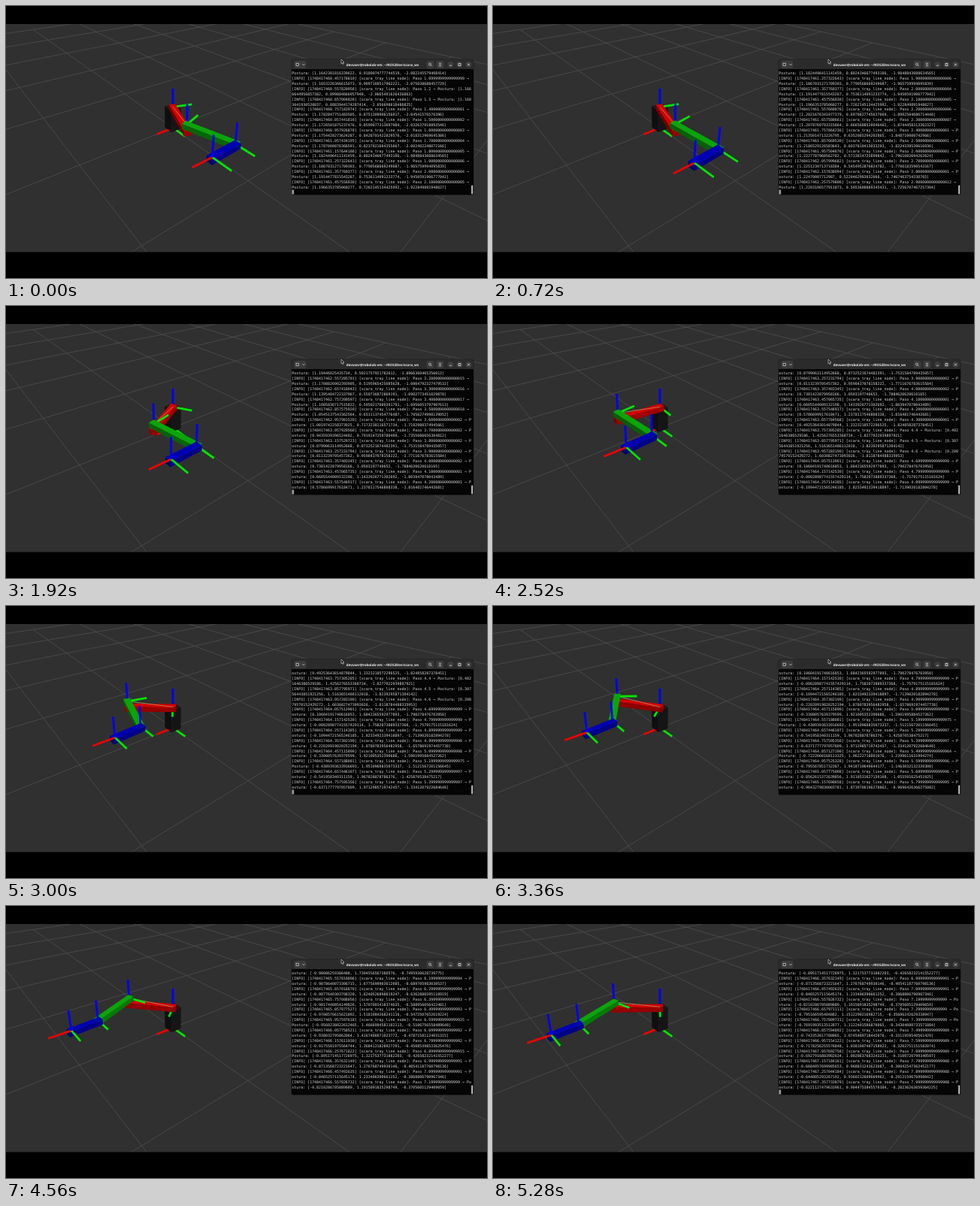
Animation of 640x362 px, one loop 5.4 s. Source, as an HTML page with a canvas:

```html
<!DOCTYPE html>
<html lang="en">
<head>
<meta charset="utf-8">
<title>Robot arm and terminal</title>
<style>
html, body { margin: 0; width: 100%; height: 100%; overflow: hidden; background: #000; }
canvas { display: block; }
</style>
</head>
<body>
<canvas id="stage" width="640" height="362"></canvas>
<script>
const ctx = document.getElementById('stage').getContext('2d');
const LOOP = 5400, STEP = 120;
const RED = [212, 0, 0], GREEN = [10, 165, 10], BLUE = [0, 0, 180], BLACK = [28, 28, 28];

// Lengths in metres
const LINK = 0.45, TOOL = 0.25, AXIS = 0.2, BASE_Z = -0.243;
const HEIGHTS = { elbow: 0.058, wrist: 0.025, tip: 0.009 };

const camera = { x: 222, y: 110, lookZ: 0.2, scale: 137.5, yaw: 0.646, pitch: 0.433, pull: 0.292 };

// Joint angles for a tray path: quintic timing over 10 s along a sine-bent diagonal
function jointAngles(time) {
  const t = time / 10;
  const p = t ** 3 * (10 - 15 * t + 6 * t * t);
  const x = -0.05 + 0.9 * p;
  const y = 0.8 - 0.9 * p + 0.25 * Math.sin(2 * Math.PI * p);
  const q2 = Math.acos((x * x + y * y) / (2 * LINK * LINK) - 1);
  return [Math.atan2(y, x) - q2 / 2, q2];
}

function nearness([x, y, z]) {
  const { yaw, pitch, lookZ, pull } = camera;
  return 1 - pull * (x * Math.sin(yaw) + y * Math.cos(yaw) + (z - lookZ) * Math.tan(pitch));
}

function project(point) {
  const [x, y, z] = point;
  const { yaw, pitch, scale, lookZ } = camera;
  const right = y * Math.sin(yaw) - x * Math.cos(yaw);
  const front = x * Math.sin(yaw) + y * Math.cos(yaw);
  const k = scale / nearness(point);
  return [camera.x + k * right,
    camera.y + k * (front * Math.sin(pitch) - (z - lookZ) * Math.cos(pitch))];
}

function line(points, color, width) {
  ctx.beginPath();
  points.forEach(p => ctx.lineTo(...p));
  ctx.strokeStyle = color;
  ctx.lineWidth = width;
  ctx.stroke();
}

function rect(x, y, w, h, color, radius = 0) {
  ctx.beginPath();
  ctx.roundRect(x, y, w, h, radius);
  ctx.fillStyle = color;
  ctx.fill();
}

function face(points, color, light) {
  ctx.beginPath();
  points.forEach(p => ctx.lineTo(...project(p)));
  ctx.closePath();
  ctx.fillStyle = `rgb(${color.map(c => Math.round(c * light))})`;
  ctx.fill();
}

const raise = ([x, y, z], dz) => [x, y, z + dz];

function box(p, q, half, height, color, overhang = 0.03) {
  const len = Math.hypot(q[0] - p[0], q[1] - p[1]);
  const dx = (q[0] - p[0]) / len, dy = (q[1] - p[1]) / len;
  const corner = (o, along, side) => [
    o[0] + dx * along * overhang - dy * side * half,
    o[1] + dy * along * overhang + dx * side * half, o[2]];
  const top = [corner(p, -1, -1), corner(q, 1, -1), corner(q, 1, 1), corner(p, -1, 1)];
  const normals = [[dy, -dx], [dx, dy], [-dy, dx], [-dx, -dy]];
  normals.forEach(([nx, ny], i) => {
    if (nx * Math.sin(camera.yaw) + ny * Math.cos(camera.yaw) <= 0) return;
    const a = top[i], b = top[(i + 1) % 4];
    face([a, b, raise(b, -height), raise(a, -height)], color, 0.55 + 0.2 * Math.max(0, ny));
  });
  face(top, color, 1);
}

function axes([x, y, z], angle) {
  const c = Math.cos(angle) * AXIS, s = Math.sin(angle) * AXIS;
  const o = project([x, y, z]);
  line([o, project([x + c, y + s, z])], '#f00000', 2.8);
  line([o, project([x - s, y + c, z])], '#00e600', 2.8);
  line([o, project([x, y, z + AXIS])], '#0000f5', 2.8);
}

function gridLine(from, to) {
  const near = 0.08, w0 = nearness(from), w1 = nearness(to);
  if (w0 < near) return;
  const f = w1 < near ? (w0 - near) / (w0 - w1) : 1;
  const end = from.map((v, i) => v + (to[i] - v) * f);
  line([project(from), project(end)], '#4f4f4f', 0.8);
}

function drawGrid() {
  for (let n = -5; n <= 5; n++) {
    gridLine([-5, n, BASE_Z], [5, n, BASE_Z]);
    gridLine([n, -5, BASE_Z], [n, 5, BASE_Z]);
  }
}

function drawRobot(time) {
  const [q1, q2] = jointAngles(time);
  const reach = ([x, y], length, angle, z) =>
    [x + length * Math.cos(angle), y + length * Math.sin(angle), z];
  const shoulder = [0, 0, 0];
  const elbow = reach(shoulder, LINK, q1, HEIGHTS.elbow);
  const wrist = reach(elbow, LINK, q1 + q2, HEIGHTS.wrist);
  const tip = reach(wrist, TOOL, 0, HEIGHTS.tip);

  axes([0, 0, BASE_Z], 0);
  box([-0.058, 0, 0], [0.058, 0, 0], 0.058, -BASE_Z, BLACK, 0);
  const parts = [
    [shoulder, elbow, () => {
      axes(shoulder, q1);
      box([0, 0, 0.015], [elbow[0], elbow[1], 0.015], 0.033, 0.055, RED);
      line([project(shoulder), project(elbow)], '#b09a68', 0.8);
    }],
    [elbow, wrist, () => {
      axes(elbow, q1 + q2);
      box(raise(elbow, 0.015), raise(wrist, 0.015), 0.033, 0.05, GREEN);
    }],
    [wrist, tip, () => {
      axes(wrist, 0);
      box(raise(wrist, 0.01), raise(tip, 0.01), 0.033, 0.05, BLUE);
      axes(tip, 0);
    }]
  ];
  const distance = ([p, q]) => nearness(p) + nearness(q);
  parts.sort((a, b) => distance(b) - distance(a)).forEach(part => part[2]());
}

function logEntry(entry) {
  let time = 0;
  for (let n = 0; n < entry; n++) time += 0.1;
  const ms = 357 + 100 * entry;
  const noise = Math.abs(Math.sin(entry * 12.9898) * 43758.5453) % 1;
  const stamp = 1748417459 + Math.floor(ms / 1000) + '.' +
    String(ms % 1000).padStart(3, '0') + String(Math.floor(noise * 1e6)).padStart(6, '0');
  const [q1, q2] = jointAngles(time);
  return `[INFO] [${stamp}] [scara_tray_line_node]: Paso ${time} → ` +
    `Postura: [${q1}, ${q2}, ${-q1 - q2}]`;
}

function text(str, x, y, font, color, align = 'left') {
  ctx.font = font;
  ctx.fillStyle = color;
  ctx.textAlign = align;
  ctx.fillText(str, x, y);
}

function drawTitleBar() {
  rect(380, 71, 242, 16, '#2b2b2b', [4, 4, 0, 0]);
  rect(383.5, 73, 16, 10, '#3b3b3b', 2);
  ctx.strokeStyle = '#d8d8d8';
  ctx.lineWidth = 0.7;
  ctx.strokeRect(386, 76.2, 3.6, 3.4);
  line([[394.5, 77.2], [396, 78.7], [397.5, 77.2]], '#d8d8d8', 0.8);
  text('devuser@robolab-vm: ~/ROS2Dev/scara_ws', 501, 79.8,
    'bold 4.5px "Open Sans", sans-serif', '#f0f0f0', 'center');
  rect(559.5, 73, 10, 10, '#3b3b3b', 2);
  rect(572.5, 73, 10, 10, '#3b3b3b', 2);
  ctx.beginPath();
  ctx.arc(564, 77.5, 1.5, 0, 7);
  ctx.strokeStyle = '#d8d8d8';
  ctx.lineWidth = 0.7;
  ctx.stroke();
  line([[565, 78.5], [566.4, 80]], '#d8d8d8', 0.8);
  [76.2, 78, 79.8].forEach(y => line([[575.8, y], [579.2, y]], '#d8d8d8', 0.7));
  [591.5, 603.5, 615.5].forEach(x => rect(x - 4, 74, 8, 8, '#3d3d3d', 4));
  line([[590, 79.2], [593, 79.2]], '#e0e0e0', 0.8);
  ctx.strokeRect(602.1, 76.6, 2.8, 2.8);
  line([[614.1, 76.6], [616.9, 79.4]], '#e0e0e0', 0.8);
  line([[616.9, 76.6], [614.1, 79.4]], '#e0e0e0', 0.8);
}

function drawTerminal(last, cursorOn) {
  rect(379.5, 70.5, 243, 181.5, '#1d1d1d', 4);
  drawTitleBar();
  rect(380, 84, 242, 167, '#050505');
  const rows = [];
  for (let entry = last - 12; entry <= last; entry++) {
    const str = logEntry(entry);
    rows.push(str.slice(0, 80), str.slice(80));
  }
  rows.slice(-23).forEach((row, i) =>
    text(row, 380.3, 91.2 + i * 6.89, '4.96px "DejaVu Sans Mono", monospace', '#d6d6d6'));
  if (cursorOn) rect(380.4, 244.6, 2.8, 6, '#9a9a9a');
  rect(619.2, 238.5, 2, 12, '#c4c4c4', 1);
}

function drawPointer() {
  ctx.beginPath();
  [[446, 71], [446, 76.6], [447.3, 75.5], [448.3, 77.5], [449.2, 77], [448.3, 75.2], [450, 75]]
    .forEach(p => ctx.lineTo(...p));
  ctx.closePath();
  ctx.fillStyle = '#111';
  ctx.fill();
  ctx.strokeStyle = '#e8e8e8';
  ctx.lineWidth = 0.6;
  ctx.stroke();
}

function draw(now) {
  const step = Math.floor(now % LOOP / STEP);
  const entry = 21 + step * 4 / 3;
  const blink = step % 9;
  ctx.textRendering = 'geometricPrecision';
  rect(0, 0, 640, 362, '#303030');
  drawGrid();
  drawRobot(entry / 10);
  drawTerminal(Math.round(entry), blink === 0 || blink > 4);
  drawPointer();
  rect(0, 0, 640, 24, '#000');
  rect(0, 327.5, 640, 35, '#000');
}

let start;
function tick(now) {
  start ??= now;
  draw(now - start);
  requestAnimationFrame(tick);
}
requestAnimationFrame(tick);
</script>
</body>
</html>
```
